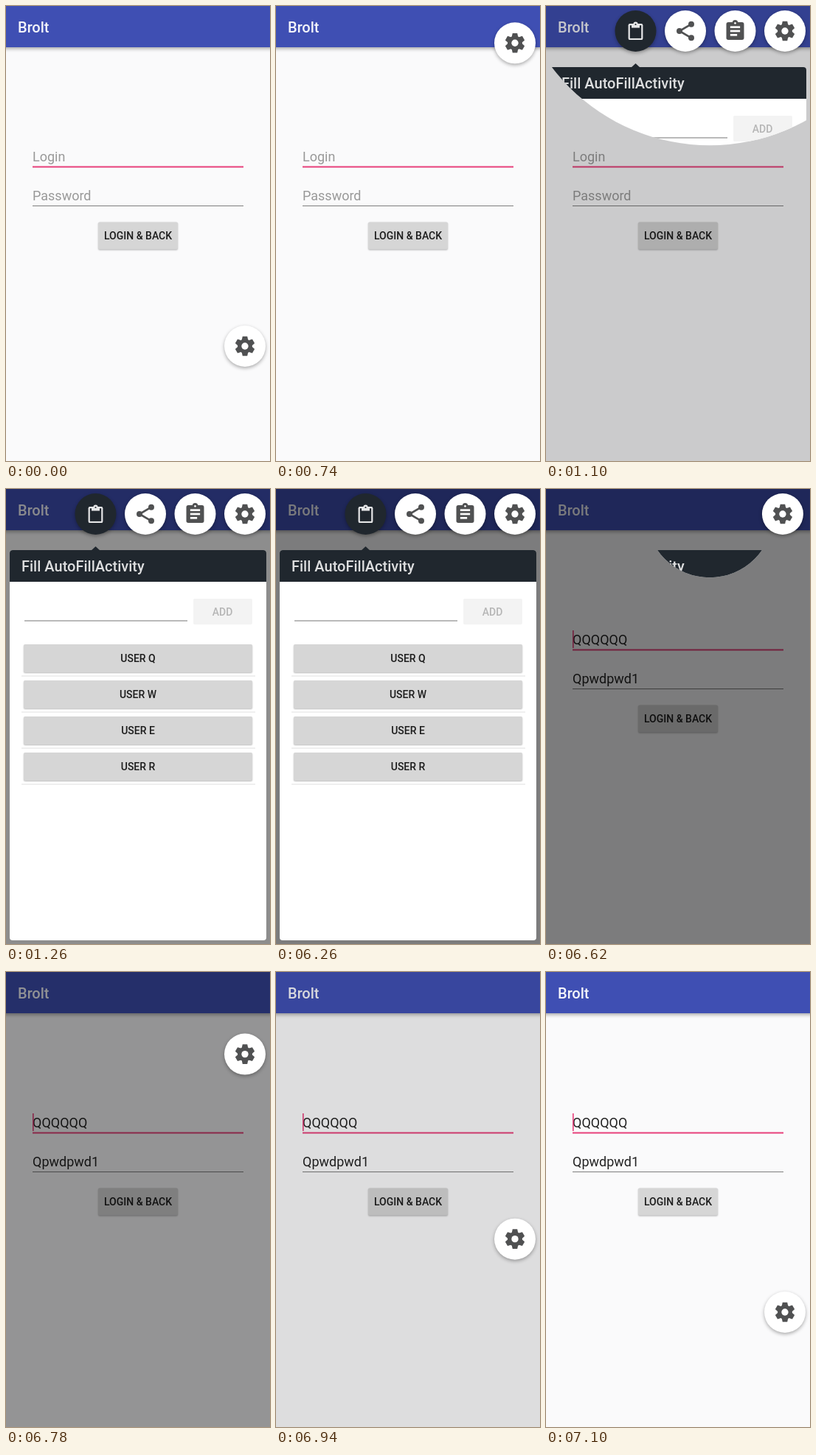
An HTML page with a canvas for the animation above (8 s loop, 358 px wide and 618 px high).

```html
<!DOCTYPE html>
<html lang="en">
<head>
<meta charset="utf-8">
<title>Autofill demo</title>
<style>
  html, body { margin: 0; width: 100%; height: 100%; overflow: hidden; background: #fafafb; }
  canvas { display: block; width: 358px; height: 618px; }
</style>
</head>
<body>
<canvas id="stage"></canvas>
<script>
const W = 358, H = 618, LOOP = 8000, STEP = 40;
const canvas = document.getElementById('stage');
const ctx = canvas.getContext('2d');
const dpr = window.devicePixelRatio || 1;
canvas.width = W * dpr;
canvas.height = H * dpr;

const DARK = '#20272e', PINK = '#e8417b', GREY = '#505152';
const TOP_Y = 34, DOCK_X = 324, DOCK_Y = 462, MEET_X = 262;

const clamp = v => Math.max(0, Math.min(1, v));
const mix = (a, b, p) => a + (b - a) * p;
const linear = (t, start, dur) => clamp((t - start) / dur);
const ease = (t, start, dur) => 0.5 - 0.5 * Math.cos(Math.PI * linear(t, start, dur));

function rect(x, y, w, h, color) {
  ctx.fillStyle = color;
  ctx.fillRect(x, y, w, h);
}

function round(x, y, w, h, r, color) {
  ctx.fillStyle = color;
  ctx.beginPath();
  ctx.roundRect(x, y, w, h, r);
  ctx.fill();
}

function disc(x, y, r, color) {
  ctx.fillStyle = color;
  ctx.beginPath();
  ctx.arc(x, y, r, 0, Math.PI * 2);
  ctx.fill();
}

function poly(points, color) {
  ctx.fillStyle = color;
  ctx.beginPath();
  points.forEach(([x, y]) => ctx.lineTo(x, y));
  ctx.fill();
}

function text(str, x, y, size, weight, color, align = 'left') {
  ctx.font = `${weight} ${size}px Roboto, sans-serif`;
  ctx.textAlign = align;
  ctx.fillStyle = color;
  ctx.fillText(str, x, y);
}

function withShadow(blur, dy, alpha, draw) {
  ctx.save();
  ctx.shadowColor = `rgba(0,0,0,${alpha})`;
  ctx.shadowBlur = blur * dpr;
  ctx.shadowOffsetY = dy * dpr;
  draw();
  ctx.restore();
}

function button(label, x, y, w, h, lift = 0) {
  withShadow(2 + lift, 1, 0.28, () => round(x, y, w, h, 2, '#d6d6d6'));
  text(label, x + w / 2, y + h / 2 + 5, 14, 500, '#1c1c1c', 'center');
}

// Icons use a 24 unit box centred on the origin.
const icons = {
  gear(bg) {
    disc(0, 0, 7.4, GREY);
    for (let i = 0; i < 6; i++) {
      ctx.save();
      ctx.rotate(i * Math.PI / 3);
      poly([[-3.3, -6], [-2.4, -10], [2.4, -10], [3.3, -6]], GREY);
      ctx.restore();
    }
    disc(0, 0, 3.5, bg);
  },
  note(bg) {
    round(-9, -9, 18, 18, 2, GREY);
    disc(0, -8.4, 2.8, GREY);
    disc(0, -8, 1, bg);
    [10, 10, 7].forEach((w, i) => rect(-5, -5 + i * 4, w, 2, bg));
  },
  share() {
    ctx.strokeStyle = GREY;
    ctx.lineWidth = 2;
    ctx.beginPath();
    ctx.moveTo(6, -7);
    ctx.lineTo(-6, 0);
    ctx.lineTo(6, 7);
    ctx.stroke();
    [[6, -7], [-6, 0], [6, 7]].forEach(([x, y]) => disc(x, y, 3, GREY));
  },
  paste(bg) {
    const ink = '#e6e7e8';
    round(-9, -9, 18, 20, 2, ink);
    rect(-7, -7, 14, 16, bg);
    rect(-5, -8, 10, 4, ink);
    disc(0, -8.6, 2.8, ink);
    disc(0, -8.2, 1, bg);
  }
};

function fab(name, x, y) {
  const bg = name === 'paste' ? DARK : '#fff';
  withShadow(5, 2, 0.32, () => disc(x, y, 28, bg));
  ctx.save();
  ctx.translate(x, y);
  const scale = name === 'paste' ? 1.1 : 1.333;
  ctx.scale(scale, scale);
  icons[name](bg);
  ctx.restore();
}

function loginScreen(filled) {
  rect(0, 0, W, H, '#fafafb');
  withShadow(5, 2, 0.35, () => rect(-9, -9, W + 18, 65, '#3f4fb3'));
  text('Brolt', 16, 36, 20, 500, '#f3f4fa');
  const ink = filled ? '#222' : '#999';
  text(filled ? 'QQQQQQ' : 'Login', 36, 211, 18, 400, ink);
  text(filled ? 'Qpwdpwd1' : 'Password', 36, 264, 18, 400, ink);
  rect(36, 217.5, 286, 2, PINK);
  rect(36, 271, 286, 1, '#7d7d7d');
  if (filled) rect(36, 192, 1.6, 24, PINK);
  button('LOGIN & BACK', 125, 293.5, 108, 37);
}

function ripple(t) {
  const p = ease(t, 6320, 180);
  ctx.save();
  ctx.beginPath();
  ctx.rect(24, 211, 310, 38);
  ctx.clip();
  disc(245, 240, 28 * p, 'rgba(0,0,0,0.07)');
  ctx.restore();
}

function panel(t, cy, r) {
  ctx.save();
  ctx.beginPath();
  ctx.arc(222, cy, r, 0, Math.PI * 2);
  ctx.clip();
  round(5, 83, 348, 530, 4, '#fff');
  round(5, 83, 348, 43, [4, 4, 0, 0], DARK);
  poly([[115, 84], [121.5, 78], [128, 84]], DARK);
  text('Fill AutoFillActivity', 21, 112, 20, 500, '#dedfe0');
  rect(25, 178.5, 221, 1, '#777');
  round(254, 149, 80, 35, 2, '#f3f3f3');
  text('ADD', 293.5, 171.5, 14, 500, '#b5b5b5', 'center');
  const pressed = t >= 6340;
  ['Q', 'W', 'E', 'R'].forEach((key, i) => {
    const y = 211 + i * 49;
    button('USER ' + key, 24, y, 310, 38, pressed && i === 0 ? 3 : 0);
    rect(21, y + 42.5, 317, 1, '#e0e0e0');
  });
  if (pressed) ripple(t);
  ctx.restore();
}

function dimAt(t) {
  if (t < 6260) return 0.5 * linear(Math.min(t, 1260), 980, 320);
  return t < 7100 ? 0.5 * (1 - ease(t, 6668, 400)) : 0;
}

function fabs(t) {
  const closing = t >= 6340;
  const fan = closing ? 1 : ease(t, 800, 200);
  const meet = closing ? ease(t, 6320, 140) : 0;
  if (fan > 0 && meet < 1) {
    [['paste', 121.5], ['share', 189], ['note', 256.5]].forEach(([name, x]) =>
      fab(name, mix(mix(DOCK_X, x, fan), MEET_X, meet), TOP_Y));
  }
  let x = DOCK_X, y;
  if (closing) {
    x = mix(mix(DOCK_X, MEET_X, meet), DOCK_X, ease(t, 6500, 140));
    y = mix(TOP_Y, DOCK_Y, ease(t, 6668, 400));
  } else {
    y = t < 500 ? DOCK_Y : mix(DOCK_Y, TOP_Y, ease(t, 460, 320));
  }
  fab('gear', x, y);
}

function render(t) {
  ctx.setTransform(dpr, 0, 0, dpr, 0, 0);
  loginScreen(t >= 6340);
  rect(0, 0, W, H, `rgba(0,0,0,${dimAt(t)})`);
  if (t < 6340) {
    const r = 755 * ease(t, 990, 270);
    if (r > 0) panel(t, -80, r);
  } else {
    const r = 620 * (1 - ease(t, 6340, 370));
    if (r > 0) panel(t, 34, r);
  }
  fabs(t);
}

const start = performance.now();
function tick() {
  const t = (performance.now() - start) % LOOP;
  render(Math.max(0, Math.floor((t - 20) / STEP) * STEP + 20));
  requestAnimationFrame(tick);
}
tick();
</script>
</body>
</html>
```
